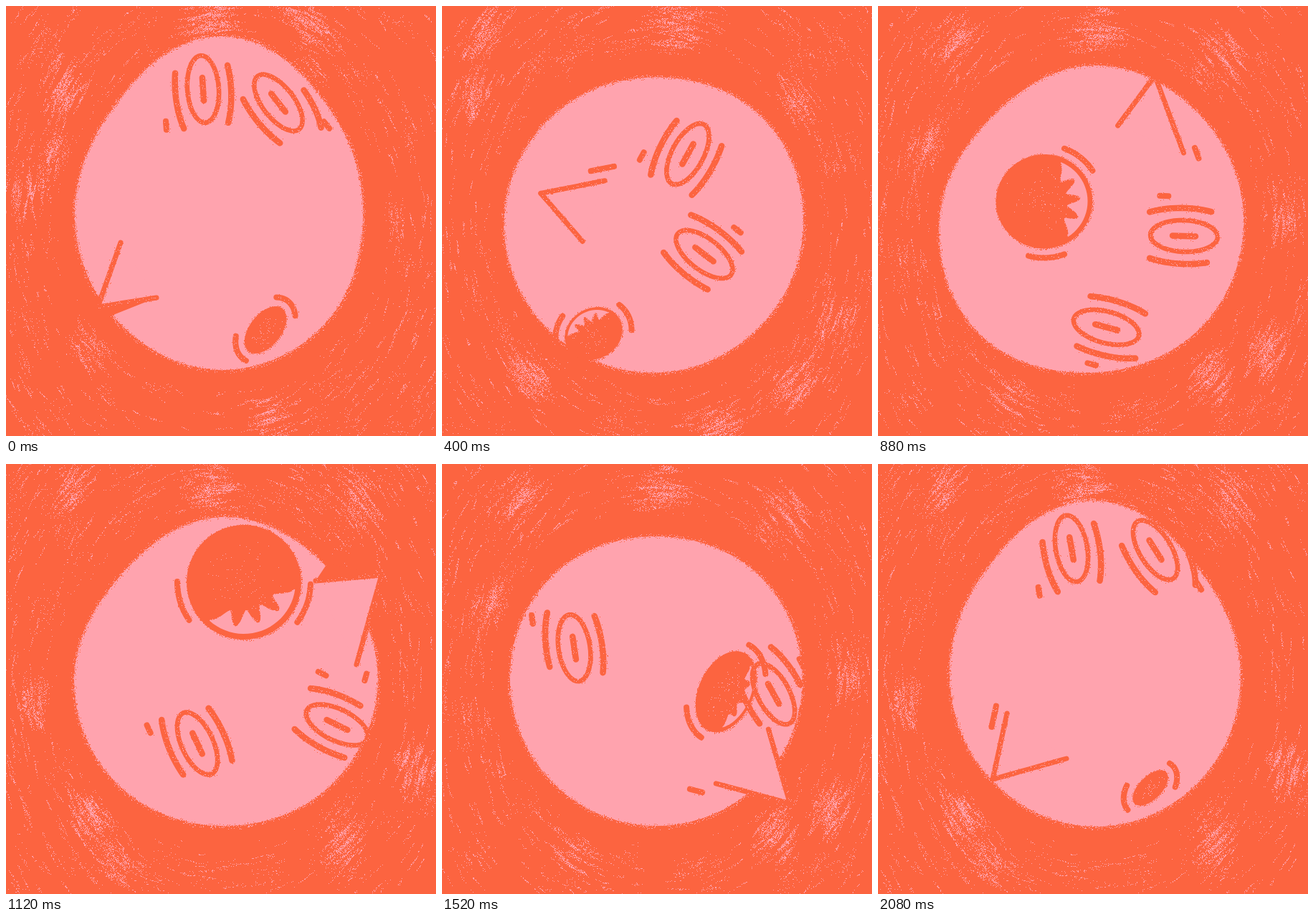
These frames come from a looping animation (600x600 px, 2.16 s). An HTML page with a canvas:

```html
<!DOCTYPE html>
<html lang="en">
<head>
<meta charset="utf-8">
<title>Tumbling face</title>
<style>
html, body { margin: 0; width: 100%; height: 100%; overflow: hidden; background: #fc6440; }
canvas { display: block; width: 600px; height: 600px; }
</style>
</head>
<body>
<canvas id="stage" width="600" height="600"></canvas>
<script>
const start = performance.now();
const ORANGE = '#fc6440', PINK = '#ffa3ae';
const STEP = 80, STEPS = 27, TAU = Math.PI * 2, RAD = Math.PI / 180;
const ctx = document.getElementById('stage').getContext('2d');

// Appends the closing row: the first one again, with column turnCol advanced by turn.
function loop(period, rows, turnCol, turn) {
  const end = rows[0].slice();
  end[0] = period;
  if (turnCol) end[turnCol] += turn;
  return rows.concat([end]);
}
const round = step => [step, ...Array(8).fill(205)];

// step, radii at every 45 degrees, clockwise from the right
const body = loop(STEPS, [
  [0, 198, 204, 208, 201, 204, 217, 258, 217],
  [3, 207, 205, 208, 201, 207, 209, 212, 210],
  [8, 198, 207, 217, 236, 222, 206, 202, 203],
  [14, 219, 213, 205, 206, 205, 201, 226, 215],
  round(17), round(22),
  [26, 206, 206, 206, 200, 200, 213, 249, 212]
]);
// step, tip, leg a, leg b, half length of the tick
const nose = loop(STEPS, [
  [0, 128, 420, 160, 330, 210, 407, 0],
  [3, 108, 341, 180, 288, 188, 378, 15],
  [8, 231, 150, 322, 190, 240, 242, 12],
  [14, 524, 155, 489, 280, 432, 163, 5],
  [17, 558, 393, 448, 420, 483, 303, 7],
  [22, 316, 505, 268, 420, 367, 427, 12],
  [26, 160, 440, 180, 348, 263, 411, 15]
]);
// step, x, y, rx, ry, angle
const mouth = loop(STEPS, [
  [0, 362, 452, 38, 22, -52],
  [3, 272, 459, 40, 31, -35],
  [8, 157, 424, 47, 43, -10],
  [14, 332, 165, 80, 80, 160],
  [17, 367, 255, 73, 54, 130],
  [22, 425, 400, 38, 20, 105],
  [26, 380, 452, 31, 16, 135]
], 5, 180);
// Both eyes share one path of two loops, half a path apart.
// step, x, y, angle, lash shift, tick shift
const eyes = loop(STEPS * 2, [
  [0, 275, 116, 86, 14, 47],
  [3, 316, 171, 102, 13, 46],
  [8, 383, 259, 148, 2, 14],
  [14, 462, 364, 206, 19, 50],
  [17, 475, 360, 204, 42, 52],
  [22, 428, 233, 297, -17, -44],
  [26, 387, 120, 238, -50, -75],
  [27, 380, 135, 232, -36, -66],
  [30, 369, 258, 192, -13, -48],
  [35, 356, 450, 295, 24, 28],
  [41, 267, 390, 425, -10, -47],
  [44, 210, 309, 398, -5, -35],
  [49, 180, 186, 515, -30, -56],
  [53, 270, 118, 440, 20, 51]
], 3, 360);

function rng(seed) {
  return () => {
    seed = seed + 0x6d2b79f5 | 0;
    let t = Math.imul(seed ^ seed >>> 15, 1 | seed);
    t = t + Math.imul(t ^ t >>> 7, 61 | t) ^ t;
    return ((t ^ t >>> 14) >>> 0) / 4294967296;
  };
}
let rand = rng(1);
const spread = r => (rand() + rand() - 1) * r;

// Smooth periodic interpolation of a track
function at(track, step) {
  const n = track.length - 1, s = step % track[n][0];
  let i = 0;
  while (track[i + 1][0] <= s) i++;
  const span = j => track[j + 1][0] - track[j][0];
  const h = span(i), u = (s - track[i][0]) / h;
  const rate = (j, c) => (track[j + 1][c] - track[j][c]) / span(j);
  const slope = (j, c) => {
    const p = (j + n - 1) % n, q = j % n;
    return (span(q) * rate(p, c) + span(p) * rate(q, c)) / (span(p) + span(q));
  };
  return track[i].slice(1).map((a, k) => {
    const c = k + 1, b = track[i + 1][c];
    const v = u * u * (3 - 2 * u);
    return a + (b - a) * v + h * u * (1 - u) * ((1 - u) * slope(i, c) - u * slope(i + 1, c));
  });
}

// Chalk paper: rubbed patches, heaviest first, plus stray streaks
function makeSheet(seed, ...patches) {
  const sheet = document.createElement('canvas');
  sheet.width = sheet.height = 600;
  const g = sheet.getContext('2d');
  rand = rng(seed);
  g.fillStyle = ORANGE;
  g.fillRect(0, 0, 600, 600);
  g.fillStyle = PINK;
  const streak = (x, y, len, wide, count) => {
    const a = Math.atan2((x - 300) * 1.5, 300 - y) + spread(.25);
    const c = Math.cos(a), s = Math.sin(a);
    for (let i = 0; i < count; i++) {
      const d = spread(len), e = spread(wide);
      const px = Math.round(x + c * d - s * e), py = Math.round(y + s * d + c * e);
      if (Math.hypot(px - 300, py - 300) > 228 + rand() * 25) g.fillRect(px, py, 1, 1);
    }
  };
  patches.forEach(([x, y], n) => {
    for (let i = 0; i < 42 - n * 3; i++) {
      streak(x + spread(34), y + spread(40), 12 + rand() * 26, 1 + rand() * 3, 14 + rand() * 22);
    }
  });
  for (let i = 0; i < 600; i++) {
    streak(rand() * 600, rand() * 600, 8 + rand() * 24, .6 + rand() * 2, 5 + rand() * 14);
  }
  for (let i = 0; i < 90; i++) streak(rand() * 600, rand() * 600, 26, 22, 22);
  return sheet;
}
const sheets = [
  makeSheet(31, [280, 20], [420, 20], [80, 110], [520, 310], [372, 580], [72, 215], [120, 480], [35, 260]),
  makeSheet(48, [325, 35], [120, 520], [385, 588], [490, 530], [490, 140], [45, 135], [60, 30], [545, 430]),
  makeSheet(65, [120, 490], [290, 35], [490, 50], [570, 430], [475, 530], [90, 30], [150, 560], [40, 335]),
  makeSheet(82, [308, 38], [545, 480], [465, 520], [485, 70], [68, 195], [108, 45], [565, 300], [185, 540])
];

function trace(pts, closed) {
  ctx.beginPath();
  for (const [x, y] of pts) ctx.lineTo(x, y);
  if (closed) ctx.closePath();
}
function fill(pts, color) {
  ctx.fillStyle = color;
  trace(pts, true);
  ctx.fill();
}
// Loose specks along a path, within r of it
function specks(pts, r, density, color) {
  ctx.fillStyle = color;
  for (let i = 1; i < pts.length; i++) {
    const [ax, ay] = pts[i - 1], [bx, by] = pts[i];
    const count = Math.floor(Math.hypot(bx - ax, by - ay) * density + rand());
    for (let k = 0; k < count; k++) {
      const t = rand();
      ctx.fillRect(Math.round(ax + (bx - ax) * t + spread(r)), Math.round(ay + (by - ay) * t + spread(r)), 1, 1);
    }
  }
}
function chalk(pts, width, closed) {
  ctx.strokeStyle = ORANGE;
  ctx.lineWidth = width;
  trace(pts, closed);
  ctx.stroke();
  specks(pts, width * .8, 1.6, ORANGE);
  specks(pts, width * .7, .35, PINK);
}
const curve = (n, fn) => Array.from({ length: n + 1 }, (_, i) => fn(i / n));
// Local to stage coordinates
function frame(x, y, deg) {
  const c = Math.cos(deg * RAD), s = Math.sin(deg * RAD);
  return (u, v) => [x + u * c - v * s, y + u * s + v * c];
}

function drawBody(step) {
  const r = at(body, step);
  const pts = curve(96, t => {
    const p = t * 8, i = Math.floor(p), u = p - i;
    const [a, b, c, d] = [7, 0, 1, 2].map(k => r[(i + k) % 8]);
    const q = b + .5 * u * (c - a + u * (2 * a - 5 * b + 4 * c - d + u * (3 * (b - c) + d - a)));
    return [300 + q * Math.cos(t * TAU), 300 + q * Math.sin(t * TAU)];
  });
  fill(pts, PINK);
  specks(pts, 5, 1.5, PINK);
  specks(pts, 3, .8, ORANGE);
}

function drawNose(step) {
  const [x, y, ax, ay, bx, by, half] = at(nose, step);
  const tip = [x, y], a = [ax, ay], b = [bx, by];
  fill([tip, a, b], PINK);
  // Leg b swells at the start of the loop and just past its middle.
  const wedge = (mid, size, place) => {
    const w = size * (1 - Math.abs(step - mid) / 2);
    if (w <= 0) return;
    const len = Math.hypot(bx - x, by - y), ux = (bx - x) / len, uy = (by - y) / len;
    fill([tip, b, [bx + (x - bx) * place - uy * w, by + (y - by) * place + ux * w]], ORANGE);
  };
  wedge(0, 16, .85);
  wedge(14, 23, .2);
  chalk(curve(10, t => [ax + (x - ax) * t, ay + (y - ay) * t]), 7);
  chalk(curve(10, t => [x + (bx - x) * t, y + (by - y) * t]), 7);
  if (half > 3) {
    const local = frame(ax, ay, Math.atan2(ay - y, ax - x) / RAD);
    const shift = step > 20 ? -8 : Math.max(0, step - 8) * 2.2;
    chalk([local(shift - half, -17), local(shift + half, -17)], 8);
  }
}

function drawMouth(step) {
  const [x, y, rx, ry, deg] = at(mouth, step);
  const local = frame(x, y, deg);
  const ring = curve(48, t => local(rx * Math.cos(t * TAU), ry * Math.sin(t * TAU)));
  fill(ring, ORANGE);
  specks(ring, 2.5, 1.2, ORANGE);
  for (let i = 0; i < rx * 1.2; i++) {
    ctx.fillStyle = PINK;
    const [px, py] = local(spread(rx * .8), spread(ry * .8));
    ctx.fillRect(Math.round(px), Math.round(py), 1, 1);
  }
  const teeth = Math.min(1, step * .22, (22 - step) * .25);
  if (teeth > .2) {
    const polar = (s, r) => {
      const t = (-90 + s * 62) * RAD;
      return local(rx * r * Math.cos(t), ry * r * Math.sin(t));
    };
    const gum = curve(24, t => polar(t * 2 - 1, .9));
    const bite = curve(64, t => {
      const s = 1 - t * 2;
      return polar(s, .88 - teeth * (.13 * (1 - s * s) + .27 * Math.sin(Math.PI * 4 * t) ** 2));
    });
    fill(gum.concat(bite), PINK);
    specks(bite, 1.8, .7, PINK);
  }
  const wx = rx + 13, wy = ry + 13;
  const mid = step < 15 ? 3 : 22, lean = 30 * Math.sin(Math.PI * Math.min(1, step / 20));
  for (const side of [mid, 195 + lean]) {
    const p0 = Math.atan2(Math.sin(side * RAD) / wy, Math.cos(side * RAD) / wx);
    const pace = Math.hypot(wx * Math.sin(p0), wy * Math.cos(p0));
    const half = Math.min(.8, (11 + rx * .22) / pace);
    chalk(curve(12, t => {
      const p = p0 + (t * 2 - 1) * half;
      return local(wx * Math.cos(p), wy * Math.sin(p));
    }), 8);
  }
}

function drawEye(step) {
  const [x, y, deg, near, tick] = at(eyes, step);
  const local = frame(x, y, deg);
  chalk(curve(40, t => local(47 * Math.cos(t * TAU), 22 * Math.sin(t * TAU))), 6.5, true);
  chalk([local(-16, 0), local(16, 0)], 8.5);
  const lash = (mid, half, side) => chalk(curve(14, t => {
    const u = Math.max(-80, Math.min(80, mid + (t * 2 - 1) * half));
    return local(u, side * 39 * Math.sqrt(1 - (u / 85) ** 2));
  }), 8.5);
  lash(near, 46 - Math.abs(near) * .5, 1);
  lash(5 + near * .3, 40, -1);
  const rise = 55 - Math.max(0, -tick - 45);
  chalk([local(tick - 6, rise), local(tick + 6, rise)], 8);
}

function draw(step) {
  rand = rng(900 + step * 7);
  ctx.lineCap = ctx.lineJoin = 'round';
  ctx.drawImage(sheets[step % 4], 0, 0);
  drawBody(step);
  drawNose(step);
  drawMouth(step);
  drawEye(step);
  drawEye(step + STEPS);
}

let shown = -1;
function tick() {
  const step = Math.floor((performance.now() - start) / STEP) % STEPS;
  if (step !== shown) draw(shown = step);
  requestAnimationFrame(tick);
}
tick();
</script>
</body>
</html>
```
